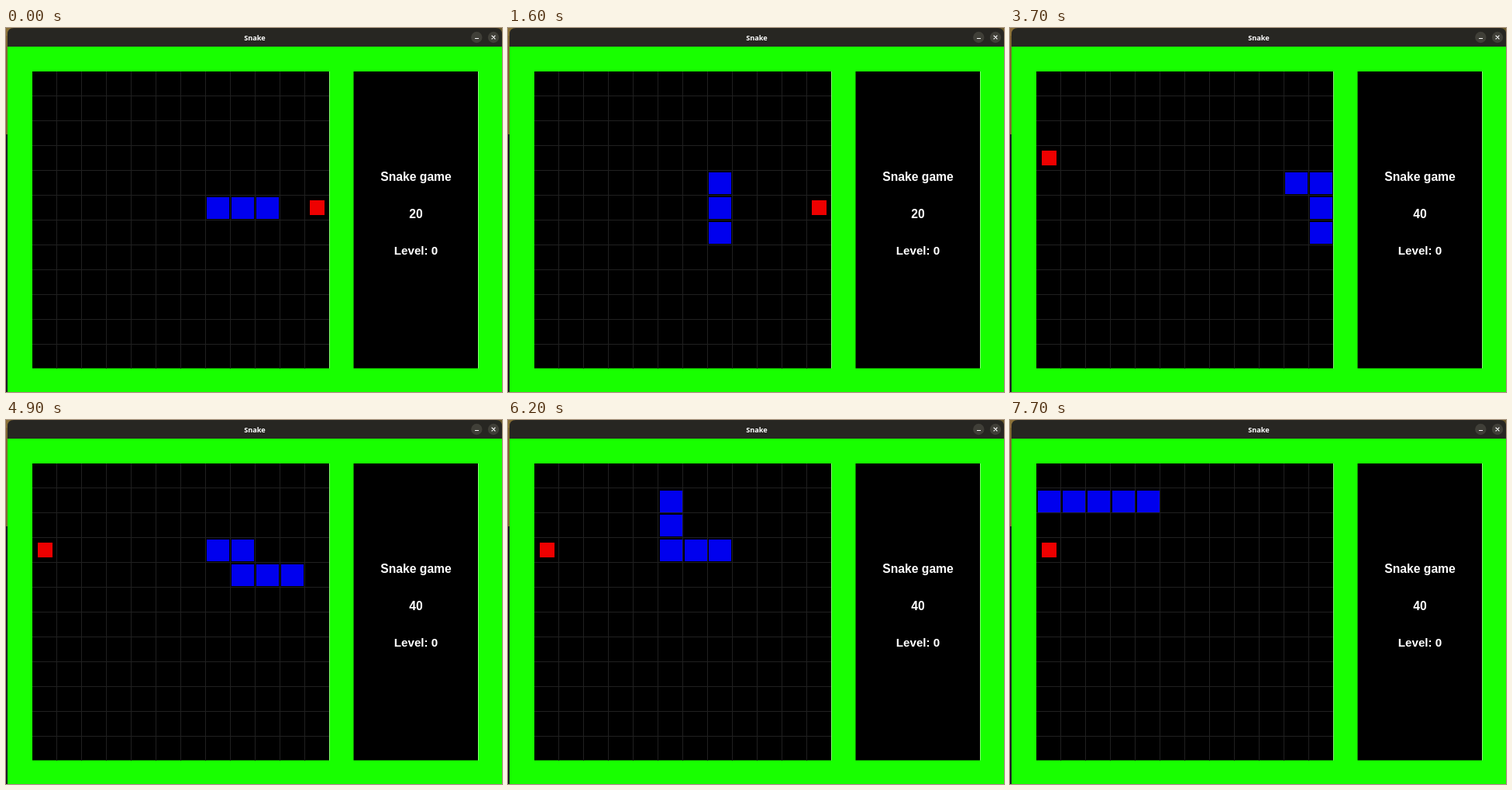
An HTML page for the animation above (8 s loop, 640x469 px).

```html
<!DOCTYPE html>
<html lang="en">
<head>
<meta charset="utf-8">
<title>Snake</title>
<style>
  html, body { margin: 0; width: 100%; height: 100%; overflow: hidden; background: #000; }
  svg { display: block; width: 640px; height: 469px; }
  text { text-anchor: middle; font-weight: bold; }
  .panel { font: bold 15.7px "Liberation Sans", Arial, sans-serif; fill: #fff; }
  .panel .level { font-size: 15.2px; }
  .title { font: bold 9.2px "Open Sans", "Noto Sans", sans-serif; fill: #fff; }
</style>
</head>
<body>
<svg viewBox="0 0 640 469">
  <rect width="640" height="469" fill="#1a1a22"/>
  <rect width="2" height="137" fill="#7d6530"/>
  <rect width="10" height="10" fill="#8a7038"/>
  <rect x="630" width="10" height="10" fill="#6b5a2c"/>
  <path d="M2 24V8Q2 0 10 0H632Q640 0 640 8V24Z" fill="#272622"/>
  <text class="title" x="321" y="15.7">Snake</text>
  <g fill="#403f38">
    <circle cx="607.3" cy="12" r="7.2"/>
    <circle cx="629" cy="12" r="7.2"/>
  </g>
  <path d="M605 13.5h5M626.6 9.6l4.8 4.8M631.4 9.6l-4.8 4.8" stroke="#fff" stroke-width="1.2"/>
  <rect x="2" y="24" width="638" height="445" fill="#18ff00"/>
  <path d="M417.3 56V438.5M609.3 56V438.5" stroke="#a4ff90"/>
  <rect x="34" y="56" width="383" height="382.5"/>
  <rect x="448.5" y="56" width="160.5" height="382.5"/>
  <path id="grid" stroke="#202020" shape-rendering="crispEdges"/>
  <rect id="food" width="19" height="19" fill="#ee0000"/>
  <g id="snake" fill="#0000ee"></g>
  <g class="panel">
    <text x="529" y="196.7">Snake game</text>
    <text id="score" x="529" y="245.4">20</text>
    <text class="level" x="529" y="292.3">Level: 0</text>
  </g>
</svg>
<script>
const LOOP = 8000, PITCH = 31.92, X0 = 34, Y0 = 56;
const START = [[7, 5], [8, 5], [9, 5]];   // tail first
const TURNS = "ULLDDRRRRUULLLULLLUULLLLL";
const STEP = { U: [0, -1], D: [0, 1], L: [-1, 0], R: [1, 0] };
const FOODS = [[11, 5], [10, 4], [0, 3]];
const $ = id => document.getElementById(id);
const cellX = c => X0 + c * PITCH;
const cellY = r => Y0 + r * PITCH;

// Put a square in its cell, on whole pixels.
function place(el, [c, r], dx, dy) {
  el.setAttribute("x", Math.round(cellX(c) + dx));
  el.setAttribute("y", Math.round(cellY(r) + dy));
}

// Time of the nth move: one tick in fifteen comes 100 ms late.
const moveTime = n => n * 300 + (n > 4 ? 100 : 0) + (n > 19 ? 100 : 0);

// Play the game once and keep the state after each move.
function play() {
  let body = START, eaten = 0, grow = false;
  const states = [{ at: 0, body, eaten }];
  [...TURNS].forEach((turn, i) => {
    const [c, r] = body[body.length - 1], [dx, dy] = STEP[turn];
    const head = [c + dx, r + dy];
    body = [...(grow ? body : body.slice(1)), head];
    grow = String(head) === String(FOODS[eaten]);
    if (grow) eaten++;
    states.push({ at: moveTime(i + 1), body, eaten });
  });
  return states;
}

let lines = "";
for (let i = 1; i < 12; i++) {
  lines += `M${Math.floor(cellX(i)) + 0.5} 56V438.5M34 ${Math.floor(cellY(i)) + 0.5}H417`;
}
$("grid").setAttribute("d", lines);

const blocks = Array.from({ length: 5 }, () => {
  const el = document.createElementNS("http://www.w3.org/2000/svg", "rect");
  el.setAttribute("width", 29);
  el.setAttribute("height", 28);
  return $("snake").appendChild(el);
});

const states = play();
let shown = null;

function draw(t) {
  const state = states.filter(s => s.at <= t).pop();
  if (state === shown) return;
  shown = state;
  blocks.forEach((el, i) => {
    const cell = state.body[i];
    el.setAttribute("display", cell ? "inline" : "none");
    if (cell) place(el, cell, 2, 2.6);
  });
  place($("food"), FOODS[state.eaten], 6.5, 6);
  $("score").textContent = 20 + state.eaten * 10;
}

const begin = performance.now();
function frame() {
  draw((performance.now() - begin) % LOOP);
  requestAnimationFrame(frame);
}
frame();
</script>
</body>
</html>
```
